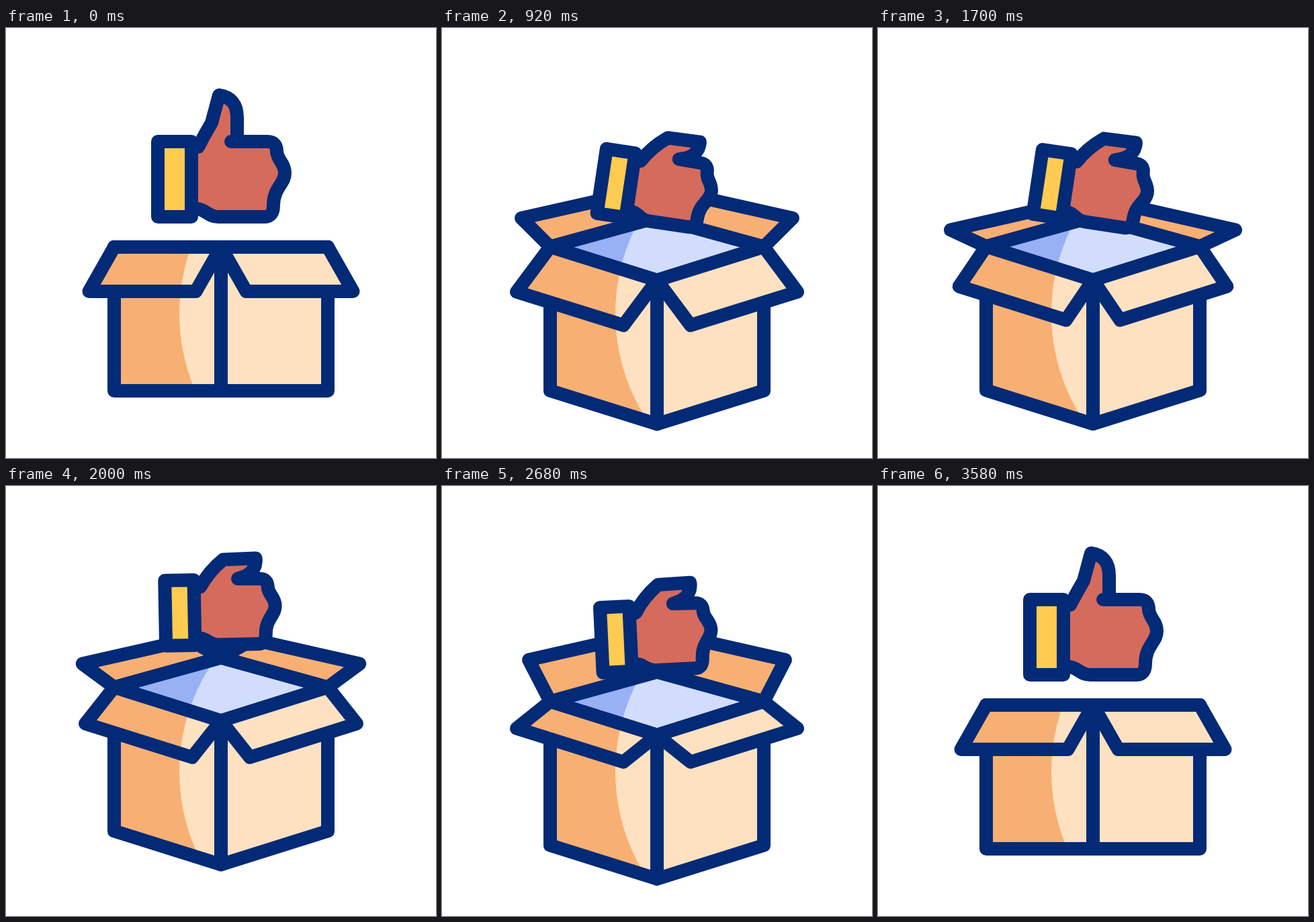
These frames come from a looping animation (640 px wide and 640 px high, 3.6 s). An HTML page with a canvas:

```html
<!DOCTYPE html>
<html>
<head>
<meta charset="utf-8">
<style>
  html, body { margin: 0; width: 100%; height: 100%; overflow: hidden; background: #fff; }
  canvas { display: block; width: 100vw; height: 100vh; }
</style>
</head>
<body>
<canvas id="stage" width="640" height="640"></canvas>
<script>
const ctx = document.getElementById('stage').getContext('2d');
const LOOP = 3600, HOP = 840;
const HOPS = [0, 1, 2].map(i => 900 + i * HOP);
const NAVY = '#032a76', SKIN = '#d56b5d', YELLOW = '#ffcb50', SPARK = '#ff6652';
const CARD = ['#f8af74', '#fde1c0'], INSIDE = ['#97b1f4', '#d2ddfd'];

// Flap tip offsets from the hinge: front x, y, back x, y
const CLOSED = [-37.5, 66, -22, 50], SPREAD = [-50, 67, -43, -43];
const RAISED = [-50, 40, -32, -62], DROOPED = [-38, 64, -58, -16];

const mix = (a, b, k) => a + (b - a) * k;
const blend = (a, b, k) => a.map((v, i) => mix(v, b[i], k));
const clamp = k => Math.min(1, Math.max(0, k));
const ramp = (t, from, to) => (1 - Math.cos(Math.PI * clamp((t - from) / (to - from)))) / 2;
const bump = (t, from, to) => Math.sin(Math.PI * clamp((t - from) / (to - from))) ** 2;
const mirror = points => points.map(([x, y]) => [640 - x, y]);

function outline(color) {
  ctx.fillStyle = color;
  ctx.fill();
  ctx.stroke();
}

function trace(points) {
  ctx.beginPath();
  points.forEach(([x, y]) => ctx.lineTo(x, y));
  ctx.closePath();
}

// Fills a panel with its shade, then its lit part inside a large fixed circle.
function panel(points, [shade, light]) {
  trace(points);
  ctx.fillStyle = shade;
  ctx.fill();
  ctx.save();
  ctx.clip();
  ctx.beginPath();
  ctx.arc(548, 425, 290, 0, 7);
  ctx.fillStyle = light;
  ctx.fill();
  ctx.restore();
  trace(points);
  ctx.stroke();
}

function flapPose(t) {
  let pose = blend(CLOSED, SPREAD, ramp(t, 220, 940));
  pose = blend(pose, RAISED, ramp(t, 940, 1340));
  pose = blend(pose, DROOPED, ramp(t, 1430, 1810) * (1 - ramp(t, 1810, 2240)));
  return blend(pose, CLOSED, ramp(t, 2860, 3360));
}

// The hand shrinks into a fist; only the thumb changes its shape.
function handShape(up) {
  const size = mix(0.866, 1, up);
  const at = (x, y) => [309 + (x - 309) * size, 234 + (y - 234) * size];
  const thumb = (fistX, fistY, upX, upY) => [mix(fistX, upX, up), mix(fistY, upY, up)];

  ctx.beginPath();
  ctx.moveTo(...thumb(290, 188, 286, 177));
  ctx.quadraticCurveTo(...thumb(303, 165, 296, 158), ...thumb(325, 148, 306, 141));
  ctx.lineTo(...thumb(373, 147, 317, 100));
  ctx.quadraticCurveTo(...thumb(374, 150, 344, 104), ...thumb(372, 158, 344, 133));
  ctx.lineTo(...thumb(370, 162, 344, 160));
  ctx.quadraticCurveTo(...thumb(365, 172, 344, 169), ...thumb(346, 177, 335, 169));
  ctx.lineTo(...at(389, 169));
  ctx.quadraticCurveTo(...at(403, 169), ...at(403, 184));
  ctx.bezierCurveTo(...at(404, 197), ...at(415, 201), ...at(415, 216));
  ctx.bezierCurveTo(...at(415, 232), ...at(398, 238), ...at(398, 264));
  ctx.quadraticCurveTo(...at(398, 281), ...at(385, 281));
  ctx.lineTo(...at(316, 281));
  ctx.bezierCurveTo(...at(300, 281), ...at(298, 270), ...at(284, 269));
  outline(SKIN);
  trace([at(226, 169), at(276, 169), at(276, 281), at(226, 281)]);
  outline(YELLOW);
}

function drawHand(t, hop) {
  const up = 1 - ramp(t, 220, 900) + ramp(t, 2660, 3440);
  const sink = 16 * ramp(t, 220, 1120) * (1 - clamp((t - 1740) / 1860)) ** 1.8;
  const toss = 25 * (bump(t, 920, 1720) + bump(t, 1760, 2300));
  const swing = ramp(t, 1740, 2160);
  const turn = 8.5 * ramp(t, 220, 920) * (1 - swing)
    - 1.5 * swing * (1 - ramp(t, 3000, 3440))
    - 4 * bump(t, HOPS[1], HOPS[1] + HOP)
    - 9 * bump(t, HOPS[2], HOPS[2] + HOP);

  ctx.save();
  ctx.translate(320, 224 + sink - toss + hop);
  ctx.rotate(turn * Math.PI / 180);
  ctx.translate(-320, -224);
  handShape(up);
  ctx.restore();
}

function drawSparks(t) {
  if (t < 3120 || t > 3480) return;
  const head = ramp(t, 3120, 3300), tail = ramp(t, 3240, 3460);
  ctx.strokeStyle = SPARK;
  ctx.lineWidth = 20 * ramp(t, 3110, 3180) * (1 - ramp(t, 3380, 3490));
  for (const side of [-1, 1]) {
    const point = k => [313 + side * mix(16, 29, k), mix(67, 53, k)];
    ctx.beginPath();
    ctx.moveTo(...point(tail));
    ctx.lineTo(...point(head));
    ctx.stroke();
  }
}

function draw(t) {
  const hop = -38.5 * HOPS.reduce((sum, start) => sum + bump(t, start, start + HOP), 0);
  const tilt = ramp(t, 220, 960) * (1 - ramp(t, 2860, 3360));
  const [frontX, frontY, backX, backY] = flapPose(t);
  const top = 326 + hop, bottom = top + 214;
  const front = 50 * tilt, back = mix(-14, 44, tilt);
  const left = [161, top], near = [320, top + front], far = [320, top - back], right = [479, top];

  ctx.fillStyle = '#fff';
  ctx.fillRect(0, 0, 640, 640);
  ctx.strokeStyle = NAVY;
  ctx.lineWidth = 20;
  ctx.lineCap = ctx.lineJoin = 'round';

  const backFlap = [left, far, [320 + backX, far[1] + backY + 8 * tilt], [161 + backX, top + backY]];
  for (const flap of [backFlap, mirror(backFlap)]) {
    trace(flap);
    outline(CARD[0]);
  }
  panel([left, far, right, near], INSIDE);

  drawHand(t, hop);

  const side = [left, near, [320, bottom + front], [161, bottom]];
  const frontFlap = [left, near, [320 + frontX, near[1] + frontY], [161 + frontX, top + frontY]];
  for (const face of [side, frontFlap]) {
    panel(face, CARD);
    panel(mirror(face), CARD);
  }
  drawSparks(t);
}

function frame() {
  draw(performance.now() % LOOP);
  requestAnimationFrame(frame);
}
frame();
</script>
</body>
</html>
```
